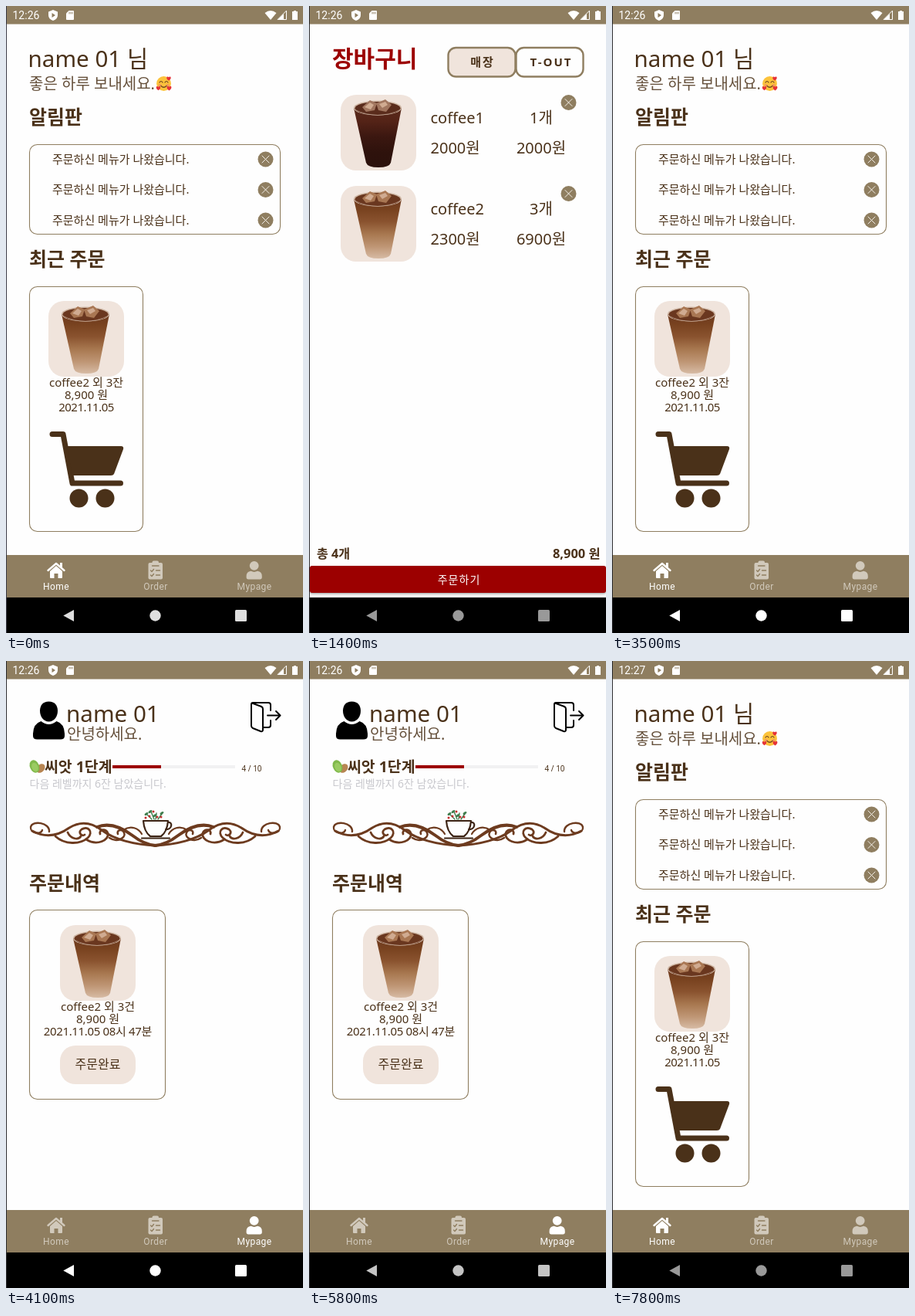
An HTML page with a canvas that plays this animation: 385 px wide and 812 px high, repeating every 8 s.

```html
<!DOCTYPE html>
<html lang="ko">
<head>
<meta charset="utf-8">
<title>Cafe order app</title>
<style>
  html, body { margin: 0; width: 100%; height: 100%; overflow: hidden; background: #fefefe; }
  canvas { display: block; width: 385px; height: 812px; }
</style>
</head>
<body>
<canvas id="stage"></canvas>
<script>
const W = 385, H = 812, LOOP = 8000;
const SANS = '"Noto Sans", "Noto Sans CJK KR", "Noto Sans CJK", sans-serif';
const ROBOTO = 'Roboto, "Noto Sans CJK KR", "Noto Sans CJK", sans-serif';
const TAN = '#8f7e60', BROWN = '#4a3119', SOFT = '#66513c', RED = '#9c0000', PEACH = '#f0e4dc', PAPER = '#fefefe';

const canvas = document.getElementById('stage');
const c = canvas.getContext('2d');
const dpr = window.devicePixelRatio || 1;
canvas.width = Math.round(W * dpr);
canvas.height = Math.round(H * dpr);

// Last value whose start time has passed.
const held = (steps, t) => steps.reduce((v, [at, next]) => (t >= at ? next : v), steps[0][1]);

const SCREENS = [[0, 'home'], [1400, 'cart'], [3200, 'home'], [4100, 'mypage'], [7500, 'home']];
const KEY_GREY = [
  [0, 222], [100, 211], [200, 200], [300, 187], [500, 168], [600, 153],
  [3100, 190], [3200, 225], [3300, 255],
  [5300, 246], [5500, 230], [5700, 212], [5800, 196], [6000, 175], [6200, 153]
];

function text(str, x, y, size, { weight = 400, color = BROWN, align = 'left', gap = 0, font = SANS } = {}) {
  c.font = `${weight} ${size}px ${font}`;
  c.letterSpacing = gap + 'px';
  c.textAlign = align;
  c.fillStyle = color;
  c.fillText(str, x, y);
}

function rect(x, y, w, h, color) {
  c.fillStyle = color;
  c.fillRect(x, y, w, h);
}

function box(x, y, w, h, r, fill, stroke, line = 1.1) {
  c.beginPath();
  c.roundRect(x, y, w, h, r);
  if (fill) { c.fillStyle = fill; c.fill(); }
  if (stroke) { c.strokeStyle = stroke; c.lineWidth = line; c.stroke(); }
}

function oval(x, y, rx, ry, color, turn = 0) {
  c.beginPath();
  c.ellipse(x, y, rx, ry, turn, 0, Math.PI * 2);
  c.fillStyle = color;
  c.fill();
}

const dot = (x, y, r, color) => oval(x, y, r, r, color);

function shape(d, color) {
  c.fillStyle = color;
  c.fill(new Path2D(d));
}

function line(d, color, width) {
  c.strokeStyle = color;
  c.lineWidth = width;
  c.lineCap = c.lineJoin = 'round';
  c.stroke(new Path2D(d));
}

function at(x, y, draw) {
  c.save();
  c.translate(x, y);
  draw();
  c.restore();
}

function closeButton(x, y) {
  dot(x, y, 10, TAN);
  at(x, y, () => line('M-4.5-4.5L4.5 4.5M4.5-4.5L-4.5 4.5', '#f4efe8', 1));
}

function drink(x, y, tones, ice) {
  at(x, y, () => {
    box(0, 0, 98, 98, 20, PEACH);
    const g = c.createLinearGradient(0, 14, 0, 95);
    tones.forEach((tone, i) => g.addColorStop(i / (tones.length - 1), tone));
    shape('M17 17L33 88Q35 94 49 94Q63 94 65 88L79 17Z', g);
    oval(48, 17, 31, 9.5, '#cdb5a2');
    oval(48, 17.5, 29.5, 8.5, tones[0]);
    shape('M28 16L38 7L47 11L44 20L33 22ZM46 11L58 6L66 13L59 22L49 20Z', ice);
    shape('M31 16L38 10L43 13L39 19ZM50 12L58 9L61 13L54 17Z', '#d0ab91');
    line('M18 19Q48 34 78 19', 'rgba(235,212,194,.4)', 1);
  });
}

const latte = (x, y) => drink(x, y, ['#6a371f', '#78421f', '#8a532f', '#a87850', '#bf9675', '#d8bda7'], '#a97753');
const black = (x, y) => drink(x, y, ['#5a2c1c', '#542317', '#3b1710', '#2e120c', '#2b110c'], '#a1765f');

function heart(x, y, s) {
  at(x, y, () => {
    c.scale(s, s);
    shape('M0 4C-7-1-3-6 0-2.5C3-6 7-1 0 4Z', '#e53238');
  });
}

function smiley(x, y) {
  dot(x, y, 9.4, '#fcc33b');
  oval(x - 5, y + 2, 2.2, 1.6, '#f39a5c');
  oval(x + 5, y + 2, 2.2, 1.6, '#f39a5c');
  at(x, y, () => line('M-5.5-1.5Q-3.5-4.5-1.5-1.5M1.5-1.5Q3.5-4.5 5.5-1.5M-3.5 3Q0 6.5 3.5 3', '#6a4022', 1.2));
  heart(x + 6.5, y - 6.5, 0.7);
  heart(x - 7, y + 6, 0.7);
  heart(x + 7, y + 6, 0.75);
}

function trolley() {
  line('M60 554.5H74L86 618H148.5', BROWN, 7);
  shape('M79 570H149Q153 570 152 574L140 606Q139 608 136 608H86Z', BROWN);
  dot(94.5, 637.5, 12, BROWN);
  dot(128.5, 637.5, 12, BROWN);
}

function home() {
  text('name 01 님', 28.5, 79, 29.6, { weight: 500 });
  text('좋은 하루 보내세요.', 30, 108, 20, { weight: 300, color: SOFT });
  smiley(204.5, 100.5);
  text('알림판', 30, 153, 25, { weight: 600 });
  box(30.5, 179.5, 325, 116, 10, null, TAN);
  [198.5, 238, 277.5].forEach(y => {
    text('주문하신 메뉴가 나왔습니다.', 60, y + 5, 15, { weight: 500 });
    closeButton(336.5, y);
  });
  text('최근 주문', 30, 337, 25, { weight: 600 });
  box(30.5, 363.5, 147, 317, 10, null, TAN);
  latte(55, 382);
  text('coffee2 외 3잔', 104, 493, 15, { align: 'center' });
  text('8,900 원', 104, 509, 15, { align: 'center' });
  text('2021.11.05', 104, 525, 15, { align: 'center', gap: -0.5 });
  trolley();
}

function cartRow(y, drawDrink, name, count, price, sum) {
  drawDrink(41, y);
  text(name, 157.5, y + 37, 20);
  text(price, 157.5, y + 76, 20);
  text(count, 301, y + 37, 20, { align: 'center' });
  text(sum, 301, y + 76, 20, { align: 'center' });
  closeButton(336.5, y + 10);
}

function cart() {
  text('장바구니', 30, 79, 30, { weight: 600, color: RED });
  box(180.5, 54, 87, 37.5, 10, PEACH, TAN, 2.4);
  box(268.5, 54, 87, 37.5, 10, PAPER, TAN, 2.4);
  text('매장', 225, 77.5, 15, { weight: 600, align: 'center', gap: 2 });
  text('T-OUT', 314, 77.5, 15, { weight: 600, align: 'center', gap: 2 });
  cartRow(115, black, 'coffee1', '1개', '2000원', '2000원');
  cartRow(233, latte, 'coffee2', '3개', '2300원', '6900원');
  text('총 4개', 10, 715, 16.2, { weight: 600 });
  text('8,900 원', 377.5, 715, 16.4, { weight: 600, align: 'right' });
  c.save();
  c.shadowColor = 'rgba(0,0,0,.35)';
  c.shadowBlur = 3 * dpr;
  c.shadowOffsetY = 1.5 * dpr;
  box(1, 725, 384, 35, 3, RED);
  c.restore();
  text('주문하기', 194.5, 747.5, 14, { color: '#fff', align: 'center', gap: 1, font: ROBOTO });
}

function scrolls() {
  const color = '#6d3b1f';
  line('M56 221C57 209 34 206 32 215C31 224 46 225 47 219', color, 2.4);
  line('M34 220C52 230 68 226 82 216C98 206 112 210 124 219C140 231 166 238 194 239', color, 3);
  line('M118 215C136 208 152 217 164 226C173 233 183 238 194 239', color, 4);
  line('M64 227C76 238 96 238 106 229C114 221 106 213 98 218C93 222 98 228 102 225', color, 2.8);
  line('M80 222C84 231 94 232 97 227M104 231C118 240 134 232 132 223C130 216 120 218 122 224', color, 2.8);
  line('M134 229C144 236 156 229 153 222C150 217 143 219 145 224', color, 2.6);
  line('M152 219C162 212 172 217 176 224', color, 2.2);
}

function ornament() {
  scrolls();
  at(387, 0, () => { c.scale(-1, 1); scrolls(); });
  shape('M177 206H211Q211 222 202 228H186Q177 222 177 206Z', PAPER);
  line('M178 207H210Q209 221 201 227H187Q179 221 178 207Z', '#3d2415', 2.2);
  line('M210 209C217 208 215 219 207 218M176 229.5H212', '#3d2415', 2.2);
  line('M189 205L183 199M192 205L188 195M194 205L195 197M197 205L202 198', '#3f7d4d', 1.4);
  [[182, 198], [187, 195], [193, 200], [202, 197]].forEach(([x, y]) => oval(x, y, 2.8, 1.5, '#3f7d4d', -0.6));
  [[181, 203], [186, 201], [191, 195], [196, 202], [201, 202]].forEach(([x, y]) => dot(x, y, 1.5, '#c32f2f'));
}

function exitDoor() {
  line('M319 54.5L331 59Q333 60 333 62V89Q333 92 330 91L320 87Q318 86 318 84V56Q318 54 320 54H340Q343 54 343 57V64M343 77V83Q343 86 340 86H334', '#000', 2);
  line('M339 70.5H355M350 65L355.5 70.5L350 76', '#000', 2);
}

function profile() {
  at(55.5, 77, () => {
    shape('M0-24.5C8-24.5 11.5-19 11.5-12.5C11.5-5 7 1.5 0 1.5C-7 1.5-11.5-5-11.5-12.5C-11.5-19-8-24.5 0-24.5Z', '#000');
    shape('M-10 1Q0 9 10 1Q20 4 20.5 17V20Q20.5 24.5 15 24.5H-15Q-20.5 24.5-20.5 20V17Q-20 4-10 1Z', '#000');
  });
}

function mypage() {
  profile();
  text('name 01', 78, 79, 29.6, { weight: 500 });
  text('안녕하세요.', 79, 102, 20, { weight: 300, color: SOFT });
  exitDoor();
  oval(45, 139, 4.8, 6.5, '#b78552', 0.7);
  oval(37, 136.5, 6, 8.5, '#80b94b', -0.4);
  oval(37.5, 137.5, 4, 6, '#9acb62', -0.4);
  text('씨앗 1단계', 50, 144, 19.4, { weight: 600 });
  rect(138, 135, 159, 4, '#f1f1f2');
  rect(138, 135, 63, 4, RED);
  text('4 / 10', 305.5, 143, 10, { weight: 500 });
  text('다음 레벨까지 6잔 남았습니다.', 30.5, 163.5, 14, { color: '#c8c8cd' });
  ornament();
  text('주문내역', 30, 297, 25, { weight: 600 });
  box(30.5, 322.5, 176, 245, 10, null, TAN);
  latte(70, 342);
  text('coffee2 외 3건', 119, 453, 15, { align: 'center' });
  text('8,900 원', 119, 469, 15, { align: 'center' });
  text('2021.11.05 08시 47분', 118.8, 485, 15, { align: 'center', gap: -0.35 });
  box(70, 498, 98, 50, 20, PEACH);
  text('주문완료', 119, 528, 16, { align: 'center', weight: 500 });
}

function houseIcon(color) {
  line('M54.5 731L65 722L75.5 731', color, 2.4);
  rect(70, 721, 3, 6, color);
  shape('M57 732L65 725L73 732V740Q73 741 72 741H67.5V735H62.5V741H58Q57 741 57 740Z', color);
}

function clipIcon(color) {
  box(184.5, 721, 18.5, 21.5, 2, color);
  box(189.5, 718.5, 8.5, 6, 2, color);
  line('M189.5 725H198M187.5 731L189 732.5L191.5 729.5M187.5 737L189 738.5L191.5 735.5M194.5 731H199.5M194.5 737H199.5', TAN, 1.4);
}

function userIcon(color) {
  dot(321.7, 724.8, 5.9, color);
  shape('M317.5 731.8Q321.7 734 326 731.8Q331.8 732.5 331.8 738.5V740.3Q331.8 742.4 329.6 742.4H313.8Q311.6 742.4 311.6 740.3V738.5Q311.6 732.5 317.5 731.8Z', color);
}

function tabs(screen) {
  rect(1, 711, 384, 55, TAN);
  const tint = name => (name === screen ? '#fff' : '#d1c9bb');
  houseIcon(tint('home'));
  clipIcon(tint('order'));
  userIcon(tint('mypage'));
  [['Home', 65], ['Order', 194], ['Mypage', 322]].forEach(([label, x]) =>
    text(label, x, 756, 12, { color: tint(label.toLowerCase()), align: 'center', gap: 0.4, font: ROBOTO }));
}

function statusBar(t) {
  rect(1, 0, 384, 23.5, TAN);
  text(t < 7300 ? '12:26' : '12:27', 8.5, 17, 14, { color: '#fff', font: ROBOTO });
  shape('M61 5L67 7.5V12Q67 17 61 19Q55 17 55 12V7.5Z', '#fff');
  shape('M59.5 9L64 12L59.5 15Z', TAN);
  shape('M81.5 6H87Q88 6 88 7V17Q88 18 87 18H79Q78 18 78 17V9.5Z', '#fff');
  line('M82 8V10M84 8V10M86 8V10', TAN, 0.9);
  shape('M335.5 9Q343 3 350.5 9L343 18Z', '#fff');
  line('M352.5 17.5H363.5V6.5Z', '#fff', 1);
  shape('M352 18L360 10V18Z', '#fff');
  shape('M373 6H376V7H378V18H371V7H373Z', '#fff');
}

function systemBar(t) {
  rect(1, 766, 384, 46, '#000');
  if (t >= 3100 && t < 3500) box(37, 766, 90.5, 46, 23, '#282828');
  const g = held(KEY_GREY, t), color = `rgb(${g},${g},${g})`;
  shape('M74.3 789.5L88 782V797Z', color);
  dot(193.5, 789.5, 7.2, color);
  box(297, 782, 15, 15, 1.5, color);
}

function draw(t) {
  c.setTransform(dpr, 0, 0, dpr, 0, 0);
  rect(0, 0, W, H, PAPER);
  const screen = held(SCREENS, t);
  ({ home, cart, mypage })[screen]();
  if (screen !== 'cart') tabs(screen);
  statusBar(t);
  systemBar(t);
  rect(0, 0, 1, H, t < 1200 ? '#3c3c48' : '#2e2e32');
}

const start = performance.now();
function tick() {
  draw((performance.now() - start) % LOOP);
  requestAnimationFrame(tick);
}
tick();
</script>
</body>
</html>
```
